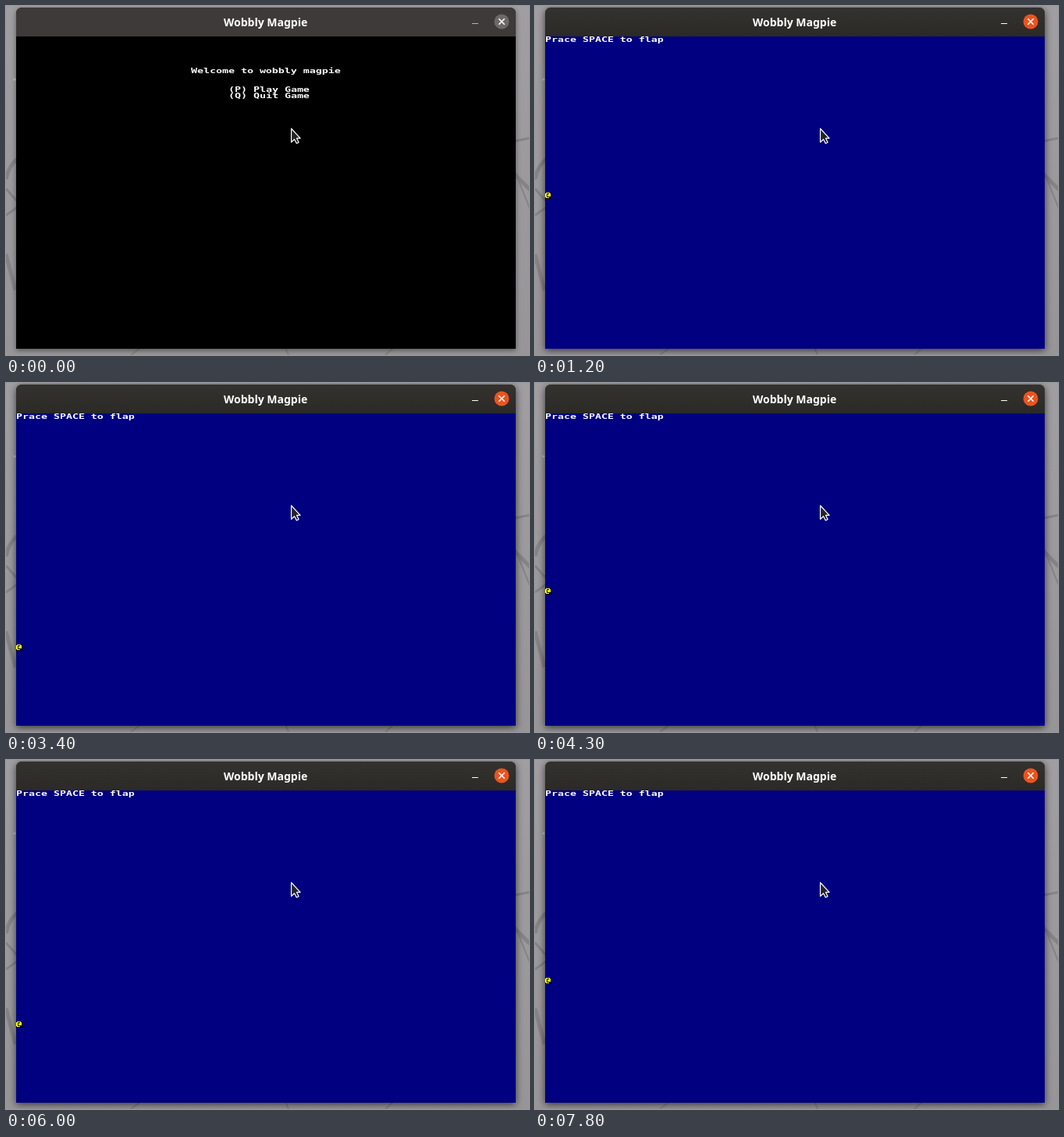
Write an HTML page that moves like this. It is 670x447 px and loops after 8000 ms.

```html
<!DOCTYPE html>
<html lang="en">
<head>
<meta charset="utf-8">
<title>Wobbly Magpie</title>
<style>
  html, body { margin: 0; width: 100%; height: 100%; overflow: hidden; background: #9c9a9c; }
  svg { display: block; width: 670px; height: 447px; }
  .wall path { fill: none; stroke: #858386; }
  .frame { filter: drop-shadow(0 2px 3px rgba(0, 0, 0, .45)); }
  .bar { fill: #3e3a39; }
  .minimize { fill: #b5b2b0; }
  .close { fill: #6c6968; }
  .focused .frame { filter: drop-shadow(0 2px 5px rgba(0, 0, 0, .65)); }
  .focused .bar { fill: url(#barFill); }
  .focused .minimize { fill: #fff; }
  .focused .close { fill: #e95420; }
  .title { font: bold 14px "Noto Sans", "Open Sans", sans-serif; fill: #fff; text-anchor: middle; }
  .term { font: bold 13.289px "DejaVu Sans Mono", monospace; fill: #fff; white-space: pre; }
  .crisp { shape-rendering: crispEdges; }
</style>
</head>
<body>
<svg viewBox="0 0 670 447">
  <defs>
    <linearGradient id="wallFill" x2="0" y2="1">
      <stop stop-color="#a09ea0"/><stop offset="1" stop-color="#979597"/>
    </linearGradient>
    <linearGradient id="barFill" x2="0" y2="1">
      <stop stop-color="#34322e"/><stop offset="1" stop-color="#2b2a26"/>
    </linearGradient>
  </defs>

  <g class="wall">
    <rect width="670" height="447" fill="url(#wallFill)"/>
    <path stroke-width="5" d="M14 196Q3 206 0 222M0 318L12 364M652 216L672 236"/>
    <path stroke-width="3" d="M0 234L14 250M0 268L14 258M652 173L672 169"/>
    <path stroke-width="2" d="M652 212L672 262M160 447L172 438M358 438L362 447M486 447L496 438"/>
    <circle cx="11" cy="94" r="1.5" fill="#c4c2c4"/>
  </g>

  <g id="window">
    <path class="frame" fill="#242320" d="M13 439V10Q13 2 21 2H645Q653 2 653 10V439Z"/>
    <path class="bar" d="M13 39V10Q13 2 21 2H645Q653 2 653 10V39Z"/>
    <text class="title" x="332.5" y="26">Wobbly Magpie</text>
    <rect class="minimize crisp" x="597" y="22" width="8" height="1"/>
    <circle class="close" cx="635" cy="20" r="9.5"/>
    <path d="M631.3 16.3l7.4 7.4m0-7.4l-7.4 7.4" stroke="#fff" stroke-width="1.6"/>
  </g>

  <rect id="screen" class="crisp" x="13" y="39" width="640" height="400"/>
  <g id="menu"></g>
  <g id="game">
    <g id="player" class="crisp">
      <rect width="8" height="8"/>
      <path fill="#ff0" d="M1 0h5v1h-5zM0 1h2v5h-2zM5 1h2v1h-2zM3 2h4v3h-4zM1 6h4v1h-4z"/>
    </g>
  </g>

  <path d="M365.5 157V174.5L369.5 170.8L372.2 176L375 174.7L372.5 169.4H377Z"
        fill="#242424" stroke="#fff" stroke-width="1.2" stroke-linejoin="round"/>
</svg>

<script>
const LOOP = 8000, TICK = 100, CELL = 8, LEFT = 13, TOP = 39;
const FOCUS_AT = 500, PLAY_AT = 1200;

// Each leg: start time, row at that time, rows per tick until the next leg.
const LEGS = [
  [1200, 25, 0],
  [1600, 26, 1], [2100, 32, 2], [2800, 43, -1],
  [4300, 28, 0],
  [5400, 29, 1], [5900, 35, 2], [6500, 43, -1],
  [7800, 30, 0]
];

const $ = id => document.getElementById(id);

function print(group, col, row, words) {
  const text = document.createElementNS("http://www.w3.org/2000/svg", "text");
  const x = LEFT + col * CELL, baseline = TOP + row * CELL + 7;
  text.setAttribute("class", "term");
  text.setAttribute("transform", `translate(${x} ${baseline}) scale(1 .72)`);
  text.textContent = words;
  $(group).append(text);
}

print("menu", 28, 5, "Welcome to wobbly magpie");
print("menu", 34, 8, "(P) Play Game");
print("menu", 34, 9, "(Q) Quit Game");
print("game", 0, 0, "Prace SPACE to flap");

function rowAt(time) {
  const [start, row, speed] = LEGS.findLast(leg => leg[0] <= time) || LEGS[0];
  return row + speed * Math.floor((time - start) / TICK);
}

function draw(time) {
  const playing = time >= PLAY_AT;
  $("window").classList.toggle("focused", time >= FOCUS_AT);
  $("screen").setAttribute("fill", playing ? "#000080" : "#000");
  $("menu").style.display = playing ? "none" : "";
  $("game").style.display = playing ? "" : "none";
  $("player").setAttribute("transform", `translate(${LEFT} ${TOP + rowAt(time) * CELL})`);
}

const begin = performance.now();
function loop() {
  draw((performance.now() - begin) % LOOP);
  requestAnimationFrame(loop);
}
loop();
</script>
</body>
</html>
```
